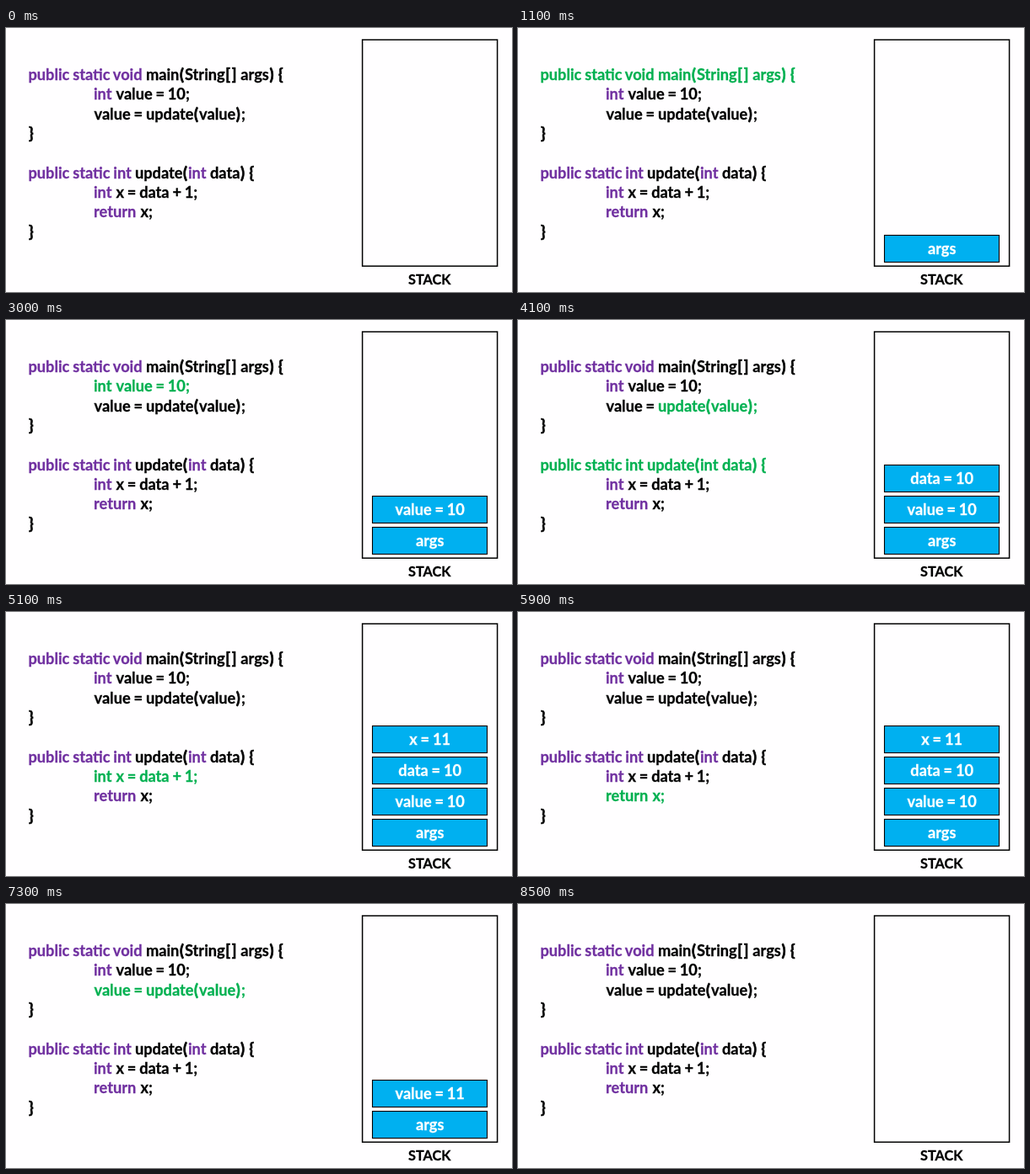
Write an HTML page that moves like this. It is 600 px wide and 314 px high and loops after 9.1 s.

```html
<!DOCTYPE html>
<html lang="en">
<head>
<meta charset="utf-8">
<style>
  html, body { margin: 0; height: 100%; overflow: hidden; background: #fffeff; }
  svg { display: block; width: 600px; height: 314px; }
  text {
    font: bold 18.2px Lato, sans-serif; word-spacing: -.6px; white-space: pre;
    fill: currentColor; stroke: currentColor; stroke-width: .3px;
  }
  .bracket { letter-spacing: 1.1px; stroke-width: .7px; }
  .label { color: #fff; text-anchor: middle; }
  .title { font-size: 16.3px; text-anchor: middle; }
  rect { stroke: #000; }
</style>
</head>
<body>
<svg viewBox="0 0 600 314">
  <rect x="422.6" y="14" width="160" height="269.2" fill="none" stroke-width="1.5"/>
  <text class="title" x="502.3" y="305">STACK</text>
</svg>
<script>
const LOOP = 9100;
const STEP_TIMES = [1100, 2100, 3100, 4200, 5200, 6100, 7100, 8200];
const KEYWORD = '#7030a0', PLAIN = '#000', ACTIVE = '#00b050';
const svg = document.querySelector('svg');

function add(parent, tag, attrs, text = '') {
  const el = document.createElementNS('http://www.w3.org/2000/svg', tag);
  for (const name in attrs) el.setAttribute(name, attrs[name]);
  el.textContent = text;
  return parent.appendChild(el);
}

// Brackets are set a little heavier and looser than the words.
function addCode(x, y, text) {
  const el = add(svg, 'text', { x, y });
  for (const part of text.split(/([()[\]{}])/).filter(Boolean))
    add(el, 'tspan', /[()[\]{}]/.test(part) ? { class: 'bracket', dx: .6 } : {}, part);
  return el;
}

// line, x, text, colour, steps in which the run is highlighted
const runs = [
  [0, 26.5, 'public static void', KEYWORD, [1]],
  [0, 166, 'main(String[] args) {', PLAIN, [1]],
  [1, 104, 'int', KEYWORD, [2]],
  [1, 130.5, 'value = 10;', PLAIN, [2]],
  [2, 104.5, 'value =', PLAIN, [7]],
  [2, 166, 'update(value);', PLAIN, [3, 7]],
  [3, 26.5, '}', PLAIN, []],
  [5, 26.5, 'public static int', KEYWORD, [3]],
  [5, 153, 'update(', PLAIN, [3]],
  [5, 216, 'int', KEYWORD, [3]],
  [5, 242, 'data) {', PLAIN, [3]],
  [6, 104, 'int', KEYWORD, [4]],
  [6, 130.5, 'x = data + 1;', PLAIN, [4]],
  [7, 104, 'return', KEYWORD, [5]],
  [7, 159.5, 'x;', PLAIN, [5]],
  [8, 26.5, '}', PLAIN, []],
].map(([line, x, text, color, steps]) => ({
  el: addCode(x, 62 + line * 23.35, text), color, steps,
}));

// label, first and last step on the stack
const slots = [
  ['args', 1, 7],
  ['value = 10', 2, 7],
  ['data = 10', 3, 5],
  ['x = 11', 4, 5],
].map(([text, first, last], i) => {
  const y = 246.5 - i * 37;
  const el = add(svg, 'g', {});
  add(el, 'rect', { x: 434.5, y, width: 136, height: 32, fill: '#00b0f0', 'stroke-width': 1.1 });
  const label = add(el, 'text', { class: 'label', x: 502.7, y: y + 22.2 }, text);
  return { el, label, first, last };
});

function draw(now) {
  const time = now % LOOP;
  const step = STEP_TIMES.filter(t => t <= time).length;
  for (const { el, color, steps } of runs)
    el.style.color = steps.includes(step) ? ACTIVE : color;
  for (const { el, first, last } of slots)
    el.setAttribute('visibility', step >= first && step <= last ? 'visible' : 'hidden');
  slots[1].label.textContent = step < 7 ? 'value = 10' : 'value = 11';
}

const start = performance.now();
function tick() {
  draw(performance.now() - start);
  requestAnimationFrame(tick);
}
tick();
</script>
</body>
</html>
```
